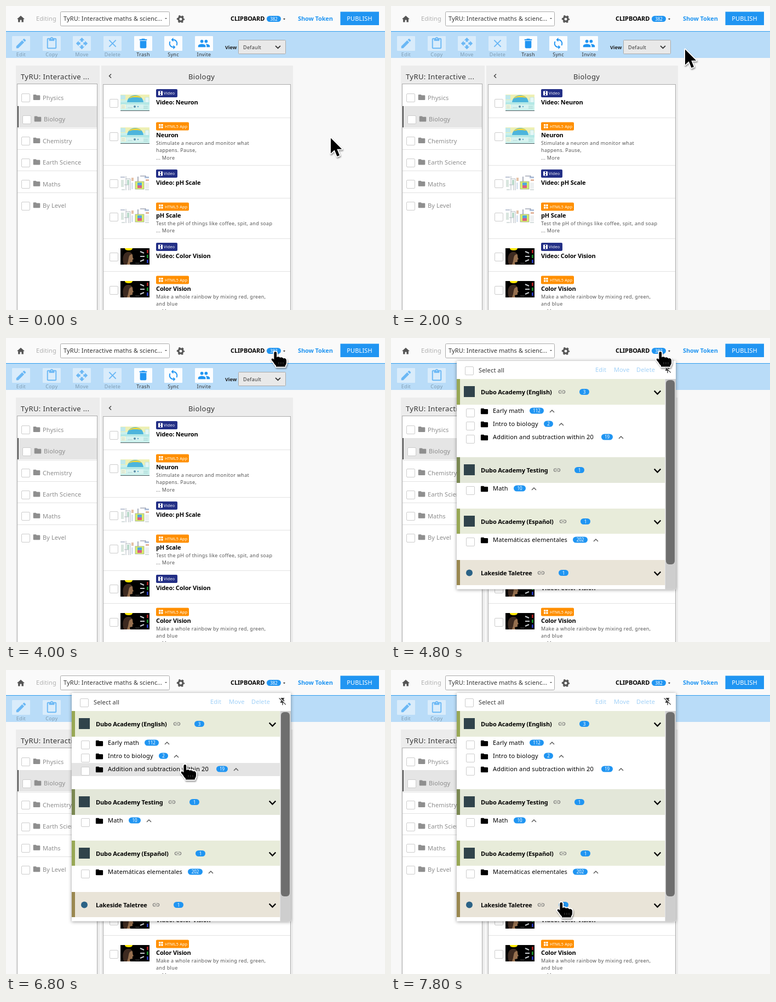
Recreate the animation shown at these times as an HTML page. Size 692 by 556 pixels, loop 8000 ms.

```html
<!DOCTYPE html>
<html lang="en">
<head>
<meta charset="utf-8">
<title>Clipboard panel</title>
<style>
html, body { margin: 0; width: 100%; height: 100%; overflow: hidden; background: #f8f8f8; }
svg { display: block; width: 692px; height: 556px; }
text { font-family: "Noto Sans", "Open Sans", sans-serif; white-space: pre; }
.h { font-size: 13px; letter-spacing: .4px; fill: #333; }
.t { font-size: 11px; letter-spacing: .17px; fill: #000; }
.m { font-size: 11px; font-weight: 500; letter-spacing: .1px; }
.b { font-size: 11px; font-weight: 600; letter-spacing: -.13px; fill: #000; }
.s { font-size: 9px; letter-spacing: .32px; fill: #555; }
.n { font-size: 8px; fill: #fff; text-anchor: middle; }
.g { font-size: 7.2px; font-weight: 500; letter-spacing: .27px; fill: #fff; }
.mid { text-anchor: middle; }
#menu { filter: drop-shadow(0 1px 3px rgba(0,0,0,.4)); }
#arrow, #hand { filter: drop-shadow(1.5px 2px 1.2px rgba(0,0,0,.4)); }
</style>
</head>
<body>
<svg id="stage" viewBox="0 0 692 556"></svg>
<script>
const BLUE = '#2095f2';
const ICONS = {
  folder: 'M10 4H4c-1.1 0-2 .9-2 2v12c0 1.1.9 2 2 2h16c1.1 0 2-.9 2-2V8c0-1.1-.9-2-2-2h-8z',
  edit: 'M3 17.25V21h3.75L17.81 9.94l-3.75-3.75zM20.71 7.04a1 1 0 0 0 0-1.41l-2.34-2.34a1 1 0 0 0-1.41 0l-1.83 1.83 3.75 3.75z',
  copy: 'M19 2h-4.18C14.4.84 13.3 0 12 0S9.6.84 9.18 2H5c-1.1 0-2 .9-2 2v16c0 1.1.9 2 2 2h14c1.1 0 2-.9 2-2V4c0-1.1-.9-2-2-2zm-7 0c.55 0 1 .45 1 1s-.45 1-1 1-1-.45-1-1 .45-1 1-1zm7 18H5V4h2v3h10V4h2z',
  move: 'M10 9h4V6h3l-5-5-5 5h3zm-1 1H6V7l-5 5 5 5v-3h3zm14 2-5-5v3h-3v4h3v3zm-9 3h-4v3H7l5 5 5-5h-3z',
  close: 'M19 6.41 17.59 5 12 10.59 6.41 5 5 6.41 10.59 12 5 17.59 6.41 19 12 13.41 17.59 19 19 17.59 13.41 12z',
  trash: 'M6 19c0 1.1.9 2 2 2h8c1.1 0 2-.9 2-2V7H6zM19 4h-3.5l-1-1h-5l-1 1H5v2h14z',
  sync: 'M12 4V1L8 5l4 4V6c3.31 0 6 2.69 6 6 0 1.01-.25 1.97-.7 2.8l1.46 1.46A7.93 7.93 0 0 0 20 12c0-4.42-3.58-8-8-8zm0 14c-3.31 0-6-2.69-6-6 0-1.01.25-1.97.7-2.8L5.24 7.74A7.93 7.93 0 0 0 4 12c0 4.42 3.58 8 8 8v3l4-4-4-4z',
  people: 'M16 11a3 3 0 1 0 0-6 3 3 0 0 0 0 6zm-8 0a3 3 0 1 0 0-6 3 3 0 0 0 0 6zm0 2c-2.33 0-7 1.17-7 3.5V19h14v-2.5c0-2.33-4.67-3.5-7-3.5zm8 0c-.29 0-.62.02-.97.05 1.16.84 1.97 1.97 1.97 3.45V19h6v-2.5c0-2.33-4.67-3.5-7-3.5z',
  home: 'M10 20v-6h4v6h5v-8h3L12 3 2 12h3v8z',
  link: 'M3.9 12c0-1.71 1.39-3.1 3.1-3.1h4V7H7a5 5 0 0 0 0 10h4v-1.9H7c-1.71 0-3.1-1.39-3.1-3.1zM8 13h8v-2H8zm9-6h-4v1.9h4a3.1 3.1 0 0 1 0 6.2h-4V17h4a5 5 0 0 0 0-10z',
  pinOff: 'M17 4V3H7v1.2L9 6.2 14.8 12H17v-1l-2-2V5h1zM2 4.3 3.3 3 21 20.7 19.7 22l-5.6-6H13v6l-1 1-1-1v-6H6v-2l2.5-2.5v-.7z'
};

// Drawing helpers
const rect = (x, y, w, h, fill, more = '') =>
  `<rect x="${x}" y="${y}" width="${w}" height="${h}" fill="${fill}" ${more}/>`;
const text = (x, y, cls, str, fill) =>
  `<text x="${x}" y="${y}" class="${cls}"${fill ? ` style="fill:${fill}"` : ''}>${str}</text>`;
const path = (d, fill, more = '') => `<path d="${d}" fill="${fill}" ${more}/>`;
const line = (d, color, w = 1) => path(d, 'none', `stroke="${color}" stroke-width="${w}"`);
const circle = (x, y, r, fill, more = '') => `<circle cx="${x}" cy="${y}" r="${r}" fill="${fill}" ${more}/>`;
const icon = (name, cx, cy, k, fill) =>
  path(ICONS[name], fill, `transform="translate(${cx - 12 * k} ${cy - 12 * k}) scale(${k})"`);
const box = (x, y) => rect(x + .5, y + .5, 15, 15, '#fff', 'rx="1.5" stroke="#ccc"');
const pill = (cx, cy, w, n) => rect(cx - w / 2, cy - 5.5, w, 11, BLUE, 'rx="5.5"') + text(cx, cy + 3, 'n', n);
const chevron = (cx, cy, w, h, color, sw) => line(`M${cx - w} ${cy - h}L${cx} ${cy + h}L${cx + w} ${cy - h}`, color, sw);
const group = (x, y, body) => `<g transform="translate(${x} ${y})">${body}</g>`;

function topBar() {
  const gear = circle(319, 24, 4.1, 'none', 'stroke="#555" stroke-width="3.2"') +
    circle(319, 24, 6.2, 'none', 'stroke="#555" stroke-width="2" stroke-dasharray="3.2 3.293" stroke-dashoffset="1.6"');
  return rect(0, 0, 692, 46, '#fafafa') + rect(0, 46, 692, 1, '#2d9bee') +
    icon('home', 27, 24, .7, '#555') + text(55, 27, 'm', 'Editing', '#b0b0b0') +
    rect(99.5, 10.5, 199, 26, '#fff', 'rx="2" stroke="#aaa"') +
    text(105, 27, 'm', 'TyRU: Interactive maths &amp; scienc...', '#333') +
    path('M290 22h4l-2 2z', '#555') + gear +
    text(410, 27, 'b', 'CLIPBOARD') + pill(489, 23.5, 26, 382) + path('M506 23h4l-2 2z', '#000') +
    text(533, 27, 'b', 'Show Token', BLUE) + rect(610.5, 10.5, 70.5, 24.5, BLUE) +
    text(645.5, 27, 't mid', 'PUBLISH', '#fff');
}

function toolbar() {
  const tools = [['edit', 'Edit'], ['copy', 'Copy'], ['move', 'Move'], ['close', 'Delete'],
    ['trash', 'Trash'], ['sync', 'Sync'], ['people', 'Invite']];
  return rect(0, 47, 692, 48, '#b9dcf8') + tools.map(([name, label], i) => {
    const x = Math.round(11.1 + i * 55.65), cx = x + 16.5, off = i < 4;
    return rect(x, 55, 33, 27, off ? '#d9ecfb' : '#fbfdff', 'rx="1"') +
      icon(name, cx, 68.5, .97, off ? '#6bb8f5' : BLUE) +
      text(cx, 92, 's mid', label, off ? '#7f9cb2' : '#333');
  }).join('') +
    text(400, 79, 's', '<tspan font-weight="700" letter-spacing="0">View</tspan>', '#222') +
    rect(424.5, 62.5, 86, 25, '#e9e9e9', 'rx="1" stroke="#aaa"') +
    text(433, 79, 's', 'Default', '#333') + chevron(496.5, 75, 4.5, 2.2, '#333', 1.8);
}

function folders() {
  const names = ['Physics', 'Biology', 'Chemistry', 'Earth Science', 'Maths', 'By Level'];
  return rect(18, 109, 153, 447, '#ececec') + text(27, 134, 'h', 'TyRU: Interactive ...') +
    rect(20.5, 142.5, 146, 430, '#fff', 'stroke="#aaa"') + names.map((name, i) => {
      const y = 143.5 + i * 39.45, on = i === 1, dx = on ? 2 : 0;
      return (on ? rect(21, 183, 145, 39, '#e5e5e5') + rect(21, 183, 2, 39, '#555') : '') +
        (i < 5 ? rect(21, Math.round(y + 39.6), 145, 1, '#e2e2e2') : '') +
        box(28 + dx, Math.round(y + 16.9)) + icon('folder', 56 + dx, y + 23.5, .63, '#8f8f8f') +
        text(67 + dx, Math.round(y + 28.3), 'm', name, '#8c8c8c');
    }).join('');
}

// Thumbnails, 53 by 30
const THUMBS = {
  neuron: rect(0, 0, 53, 30, '#c9f0ec') + rect(0, 0, 53, 10, '#eef0b4') + rect(0, 1, 9, 8, '#bfe9ec') +
    path('M12 14C13 6 19 1 27 1s14 5 15 13z', '#4db5dc') + path('M15 7C19 1 35 0 38 6L31 5H22z', '#f0d63c') +
    rect(45, 5, 7, 13, '#e4f6f6', 'stroke="#a9d6d6" stroke-width=".5"') +
    rect(0, 14, 53, 4, '#b4e8e6') + rect(1, 18, 9, 8, '#f3f6dc') + rect(11, 18, 31, 8, '#d8f3f0') +
    line('M2 21h6M2 24h6M13 24h9M42 22h8M42 25h8', '#9cc7c7', .7) +
    circle(26, 22, 2, '#5c8ea8') + circle(32, 22, 1.3, '#6ab2d0') + rect(0, 29, 53, 1, '#4b5a5e'),
  ph: rect(0, 0, 53, 30, '#fff') + rect(0, 3, 8, 2, '#bcc4d4') + rect(1, 9, 5, 13, '#d9e6df') +
    line('M10 2V28M10 7h8V28M7 18h8v10', '#a8b0b8', .9) + rect(12, 9, 4, 9, '#b9d9ca') +
    rect(20, 5, 4, 6, '#e5c2a8') + rect(20, 14, 3, 12, '#d8e3f0') +
    rect(27, 12, 16, 14, '#d9ef6a', 'stroke="#8d9892" stroke-width=".7"') + rect(31, 14, 8, 5, '#53a6dc') +
    rect(31, 19, 8, 5, '#d95f83') + line('M32 3v9M36 2h10v4', '#747d92', 1.2) +
    rect(44, 3, 8, 3, '#aebfda') + rect(46, 8, 6, 3, '#e1b39b') + rect(45, 14, 7, 11, '#edf0f1') +
    line('M45 27h7M2 27h6', '#9aa', .8),
  color: rect(0, 0, 53, 30, '#000') + path('M8 0h14q0 4-7 4T8 0z', '#ffe800') +
    path('M9 30C7 22 6 12 12 9q7-3 10 3l.5 5 1.5 3-2 1v4l-5 1 1 4z', '#96704f') +
    path('M6 30C3 20 4 9 12 7q7-1 9 4-5 0-6 7t-3 12z', '#3d2a20') +
    line('M36 6l7 3M36 15h8M36 24l7-3', '#c9cdd0', 2.2) +
    rect(48, 3, 3, 6, '#a51c1c') + rect(48, 12, 3, 6, '#168a28') + rect(48, 21, 3, 6, '#2438b5') +
    rect(27, 27, 8, 1, '#555')
};

function badge(y, video) {
  const film = rect(278, y + 3.5, 8, 8, '#fff', 'rx=".8"') + rect(281, y + 4, 2, 7, '#232f86') +
    rect(280.5, y + 7, 3, 1, '#fff');
  const tiles = [0, 1, 2, 3].map(i => rect(279 + i % 2 * 4.3, y + 3.5 + (i >> 1) * 4.3, 3.3, 3.3, '#fff')).join('');
  return video
    ? rect(274, y, 39, 15, '#232f86', 'rx="2"') + film + text(288, y + 10.3, 'g', 'Video')
    : rect(274, y, 60, 15, '#ff8f00', 'rx="2"') + tiles + text(290, y + 10.3, 'g', 'HTML5 App');
}

function lessons() {
  const more = '... More';
  const items = [
    [152, 'neuron', 'Video: Neuron'],
    [212, 'neuron', 'Neuron', 'Stimulate a neuron and monitor what', 'happens. Pause,', more],
    [299, 'ph', 'Video: pH Scale'],
    [359, 'ph', 'pH Scale', 'Test the pH of things like coffee, spit, and soap', more],
    [433, 'color', 'Video: Color Vision'],
    [493, 'color', 'Color Vision', 'Make a whole rainbow by mixing red, green,', 'and blue', more]
  ];
  return rect(174, 109, 350, 447, '#ececec') +
    line('M192 124.5L188.5 128L192 131.5', '#444', 1.5) + text(333, 134, 'h', 'Biology') +
    rect(177.5, 143.5, 342, 430, '#fff', 'stroke="#aaa"') +
    items.map(([y, pic, title, ...desc], i) => {
      const video = !desc.length;
      return (i ? rect(178, y - 8, 341, 1, '#e2e2e2') : '') +
        box(189, y + (video ? 18 : 19)) + group(209, y + 10, THUMBS[pic]) +
        badge(video ? y : y + .5, video) + text(274, y + 28, 'b', title) +
        desc.map((d, j) => text(274, Math.round(y + 41.8 + j * 13.4), 's', d)).join('');
    }).join('');
}

// Menu rows: text, middle, pill centre, pill width, count, caret x
const ROWS = [
  ['Early math', 133, 266, 26, 112, 294], ['Intro to biology', 157, 287.5, 17, 2, 311],
  ['Addition and subtraction within 20', 181, 394.5, 21, 19, 420],
  ['Math', 275, 235, 22, 10, 261], ['Matemáticas elementales', 369, 345.5, 27, 202, 374]
];
// Menu headings: text, top, colours, link x, pill x, count
const HEADS = [
  ['Dubo Academy (English)', 75, '#e8ecda', '#98a855', 312, 353, 3],
  ['Dubo Academy Testing', 218, '#e3e7d9', '#7a8852', 303, 344, 1],
  ['Dubo Academy (Español)', 312, '#e8ecda', '#98a855', 314, 355, 1],
  ['Lakeside Taletree', 406, '#e9e4d8', '#9a8850', 274, 315, 1]
];

function menu() {
  return `<g id="menu">${rect(120, 42, 400, 417.5, '#fff')}</g>` +
    rect(135.5, 52.5, 15, 15, '#fff', 'rx="1.5" stroke="#ccc"') +
    text(160, 63, 't', 'Select all', '#333') +
    [['Edit', 373], ['Move', 407], ['Delete', 448]].map(([s, x]) => text(x, 62, 'm', s, '#a3d2f8')).join('') +
    icon('pinOff', 505, 57, .68, '#333') +
    rect(120, 0, 380, 24, '#e4e4e4', 'id="hover"') +
    HEADS.map(([name, y, bg, bar, link, px, n], i) => {
      const c = y + 23.5, h = i < 2 ? 47 : 46;
      return rect(120, y, 380, h, bg) + rect(120, y, 6, h, bar) +
        (i < 3 ? rect(133, c - 10.5, 20, 20, '#30434b') : circle(143, c, 6, '#2b6286')) +
        text(164, c + 4.3, 'b', name) + icon('link', link, c, .62, '#777') +
        pill(px, c, 18, n) + chevron(486.5, c + 1, 5.8, 3, '#000', 2.4);
    }).join('') +
    ROWS.map(([name, y, px, w, n, cx]) =>
      box(137, y - 4) + icon('folder', 170.5, y + 1, .66, '#000') + text(186, y + 4, 't', name) +
      pill(px, y, w, n) + chevron(cx, y + 1, 4, -2, '#555', 1.4)).join('') +
    rect(500.5, 75, 19.5, 384.5, '#cecece') + rect(502, 77, 16, 337, '#6e6e6e', 'rx="6"');
}

const ARROW = 'M1 2.5V30.5L7.8 24.3L12.5 36L17 34.2L12.3 22.8H21.2Z';
const HAND = 'M-1.6 4.4Q-1.6 2 .8 2Q3.2 2 3.2 4.4V12.4Q4.4 11 6.6 11.2Q9 11.4 9.2 13.2Q10.4 12 12.6 12.4Q15 12.8 15.2 14.6' +
  'Q16.6 13.4 18.6 14.2Q21 15.2 21 18V22Q21 25.6 18.8 27.6V29.6H2V27.6Q-1 25 -3 21L-6 17.6Q-7 15.6 -5.2 14.6Q-3.6 14.2 -1.6 16.4Z';
const outline = 'stroke="#fff" stroke-width="3.6" stroke-linejoin="round" paint-order="stroke"';

document.getElementById('stage').innerHTML =
  rect(0, 0, 692, 556, '#f8f8f8') + topBar() + toolbar() + folders() + lessons() +
  `<g id="popup">${menu()}</g><g id="cursor">` +
  path(ARROW, '#000', `id="arrow" ${outline}`) +
  `<g id="hand">${path(HAND, '#000', outline)}${line('M7 21v4M11 21v4M15 21v4', '#555', .8)}</g></g>`;

const [popup, hover, cursor, arrow, hand] =
  ['popup', 'hover', 'cursor', 'arrow', 'hand'].map(id => document.getElementById(id));

// Pointer waypoints: time, x, y
const TRACK = [
  [0, 592, 239], [1000, 592, 239], [2000, 536, 77], [2200, 447, 51], [2400, 404, 32], [2600, 404, 32],
  [3000, 440, 45], [3400, 485, 44], [3800, 474, 21], [4000, 491, 23], [5400, 491, 23],
  [6200, 379, 54], [6600, 323, 104], [6800, 326, 171], [7800, 310, 423]
];
const LOOP = 8000, STEP = 200;
const show = (el, on) => el.setAttribute('display', on ? 'inline' : 'none');

function pointer(t) {
  const i = Math.max(1, TRACK.findIndex(p => p[0] >= t));
  const [t0, x0, y0] = TRACK[i - 1], [t1, x1, y1] = TRACK[i];
  const k = (t - t0) / (t1 - t0);
  return [x0 + (x1 - x0) * k, y0 + (y1 - y0) * k];
}

function draw(ms) {
  const t = Math.floor(ms % LOOP / STEP) * STEP;
  const [x, y] = pointer(t);
  const pointing = t === 2200 || t >= 3800;
  cursor.setAttribute('transform', `translate(${Math.round(x)} ${Math.round(y)})`);
  show(arrow, !pointing);
  show(hand, pointing);
  show(popup, t >= 4800);
  const row = ROWS.find(r => Math.abs(y - r[1] - .5) < 12);
  show(hover, t >= 4800 && row);
  if (row) hover.setAttribute('y', row[1] - 11);
}

const start = performance.now();
function tick() {
  draw(performance.now() - start);
  requestAnimationFrame(tick);
}
tick();
</script>
</body>
</html>
```
